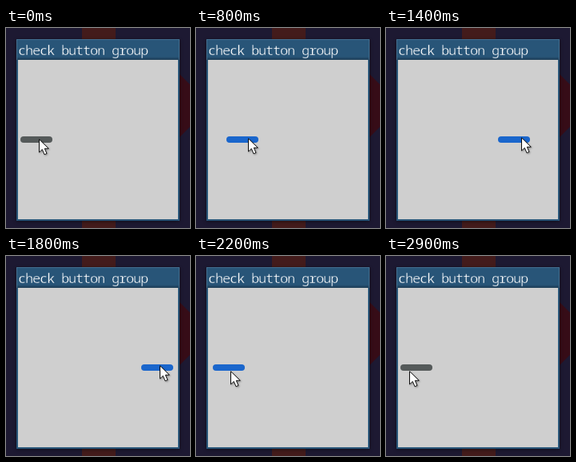
These frames come from a looping animation (230 px wide and 251 px high, 3100 ms). An HTML page:

```html
<!DOCTYPE html>
<html lang="en">
<head>
<meta charset="utf-8">
<title>check button group</title>
<style>
  html, body { margin: 0; width: 100%; height: 100%; overflow: hidden; background: #1d1932; }
  svg { display: block; }
  /* The bar-coloured stroke thins the strokes of the title. */
  text {
    font: 300 17px "Noto Sans Mono", "DejaVu Sans Mono", monospace;
    letter-spacing: -1.2px;
    fill: #fff; stroke: #285578; stroke-width: .35px;
  }
</style>
</head>
<body>
<svg width="230" height="251" viewBox="0 0 230 251">
  <defs>
    <filter id="soft" x="-10%" y="-10%" width="120%" height="120%">
      <feGaussianBlur stdDeviation="2"/>
    </filter>
    <filter id="drop" x="-40%" y="-30%" width="200%" height="180%">
      <feDropShadow dx="1" dy="1" stdDeviation="1" flood-opacity=".35"/>
    </filter>
    <linearGradient id="shade" x2="0" y2="1">
      <stop stop-opacity="0"/>
      <stop offset="1" stop-opacity=".3"/>
    </linearGradient>
  </defs>

  <rect width="230" height="251" fill="#1d1932"/>
  <rect x="95" width="42" height="251" fill="#431b1b"/>
  <path d="M216 57L230 71V124L216 138Z" fill="#360c17"/>

  <rect x="13" y="15" width="204" height="228" fill="#000" opacity=".5" filter="url(#soft)"/>
  <rect x="13" y="14" width="204" height="228" fill="#285578"/>
  <rect x="13" y="36" width="204" height="4" fill="url(#shade)"/>
  <path d="M13.5 40V14.5H216.5V40" fill="none" stroke="#4c7899" stroke-opacity=".75"/>
  <rect x="15" y="40" width="200" height="200" fill="#cfcfcf"/>
  <text x="15" y="34">check button group</text>

  <rect id="bar" y="136" width="40" height="8" rx="4"/>
  <path id="cursor" d="M.5 .8V17L4.3 13.4 7 19.8 10 18.5 7.3 12.3H12.3Z"
        fill="#fff" stroke="#111" stroke-linejoin="round" filter="url(#drop)"/>
</svg>
<script>
  const LOOP = 3100, STEP = 100;
  const grey = [85, 90, 90], blue = [26, 102, 204];
  const bar = document.getElementById("bar");
  const cursor = document.getElementById("cursor");

  const ramp = (t, from, to) => Math.min(1, Math.max(0, (t - from) / (to - from)));
  const ease = (t, from, to) => {
    const u = ramp(t, from, to);
    return u * u * (3 - 2 * u);
  };

  function draw() {
    const now = performance.now() % LOOP;
    const t = Math.floor(now / STEP) * STEP;

    // Drag right, then back left; the bar trails the pointer.
    const barX = 18 + 152 * (ease(t, 525, 1748) - ease(t, 1780, 2238));
    const tipX = 41 + 152 * ease(t, 500, 1700) - 164 * ease(t, 1780, 2290);
    const tipY = 139 - 2 * ease(t, 500, 1000) + 7 * ease(t, 1780, 2200);

    const glow = ramp(t, 400, 550) - ramp(t, 2600, 2900);
    const color = grey.map((c, i) => Math.round(c + (blue[i] - c) * glow));

    bar.setAttribute("x", Math.round(barX));
    bar.setAttribute("fill", `rgb(${color})`);
    cursor.setAttribute("transform", `translate(${Math.round(tipX)} ${Math.round(tipY)})`);
    requestAnimationFrame(draw);
  }
  draw();
</script>
</body>
</html>
```
